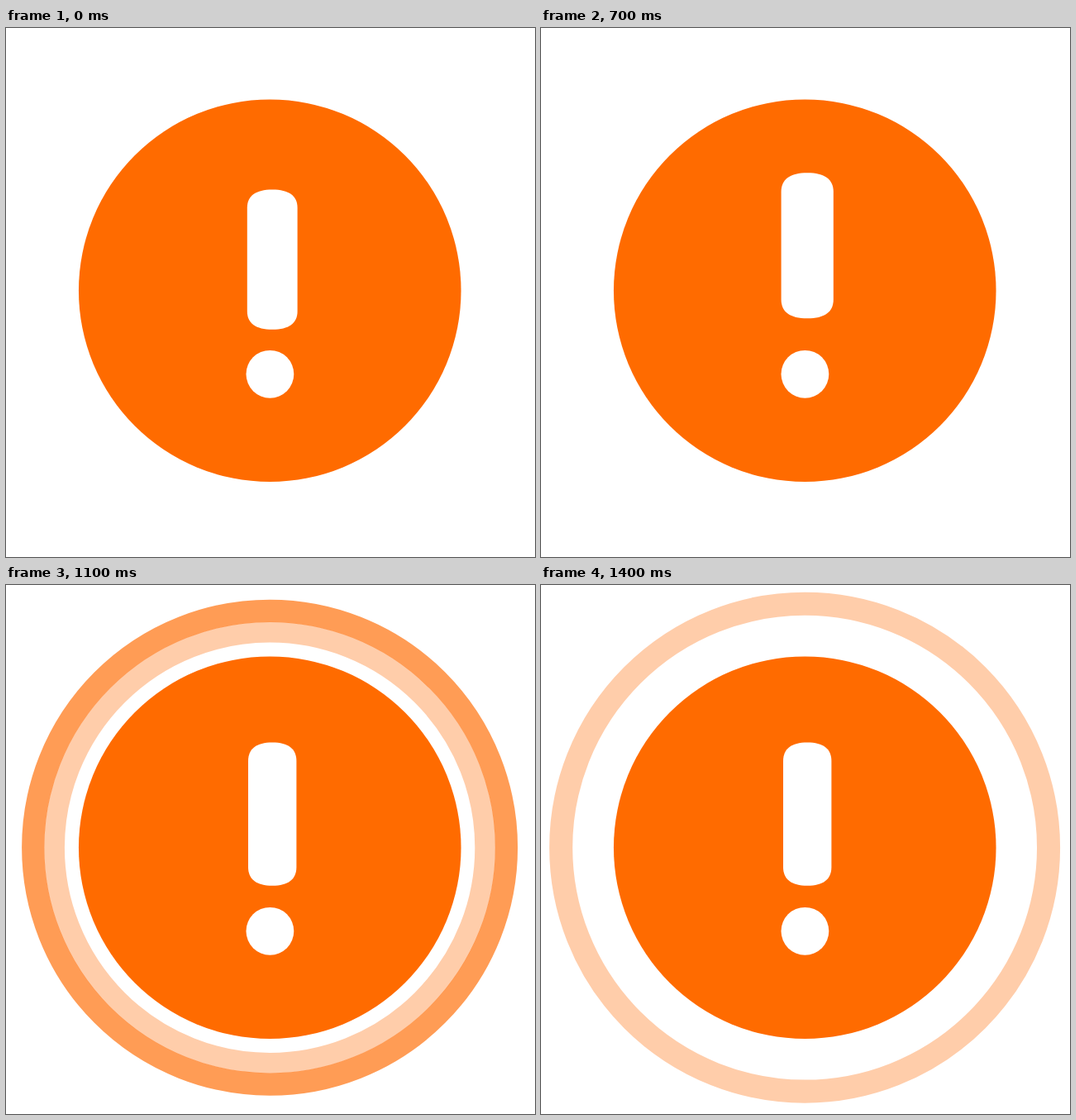
Write an HTML page that moves like this. It is 640 px wide and 640 px high and loops after 1.5 s.

```html
<!DOCTYPE html>
<html lang="en">
<head>
<meta charset="utf-8">
<title>Alert</title>
<style>
html, body { margin: 0; width: 100%; height: 100%; overflow: hidden; background: #fff; }
svg { display: block; width: 100%; height: 100%; }
</style>
</head>
<body>
<svg viewBox="0 0 640 640">
  <g fill="none" stroke="#ff6b00">
    <circle class="ring" cx="319.1" cy="317.7"/>
    <circle class="ring" cx="319.1" cy="317.7"/>
  </g>
  <circle cx="319.25" cy="317.75" r="231.3" fill="#ff6b00"/>
  <path id="bar" fill="#fff"/>
  <ellipse id="dot" cx="319.4" rx="28.9" fill="#fff"/>
</svg>
<script>
const LOOP = 1500, STEP = 100, TICK = 40;
const APEX = 11, LAND = 19, RING_GAP = 6;
const bar = document.getElementById('bar');
const dot = document.getElementById('dot');
const rings = document.querySelectorAll('.ring');

const rest = { w: 58.4, top: 190.5, bottom: 363.8 };
const crouch = { w: 68, top: 210, bottom: 368 };
const leap = { w: 58.4, top: 140.7, bottom: 334.7 };
const apex = { w: 58.4, top: 117, bottom: 314 };

function mix(a, b, u) {
  const out = {};
  for (const k in a) out[k] = a[k] + (b[k] - a[k]) * u;
  return out;
}

// 1 at the peak, falling linearly to 0 at the given reach
const bump = (t, peak, reach) => Math.max(0, 1 - Math.abs(t - peak) / reach);

function set(el, attrs) {
  for (const name in attrs) el.setAttribute(name, attrs[name]);
}

// The jump mirrors around its apex; only the settling is quicker than the windup.
function barPose(tick) {
  const d = Math.abs(tick - APEX);
  if (d <= 4) return mix(apex, leap, (d / 4) ** 2);
  if (d <= 8) return mix(leap, crouch, (d - 4) / 4);
  const span = tick < APEX ? 4 : 3;
  return mix(crouch, rest, Math.min(1, (d - 8) / span));
}

// Pill with slightly full corners
function pill({ w, top, bottom }) {
  const cx = 322.2, rx = w / 2, ry = (bottom - top) * 0.13, k = 0.66;
  const l = cx - rx, r = cx + rx, hx = rx * k, hy = ry * (1 - k);
  const up = top + ry, low = bottom - ry;
  return `M${l} ${up}C${l} ${top + hy} ${cx - hx} ${top} ${cx} ${top}` +
    `S${r} ${top + hy} ${r} ${up}V${low}` +
    `C${r} ${bottom - hy} ${cx + hx} ${bottom} ${cx} ${bottom}` +
    `S${l} ${bottom - hy} ${l} ${low}Z`;
}

function draw(ms) {
  const held = Math.floor((ms % LOOP) / STEP) * STEP;
  const tick = Math.floor(held / TICK);

  set(bar, { d: pill(barPose(tick)) });

  const ry = 28.9 * (1 - 0.1 * bump(tick, LAND + 3, 4));
  set(dot, { cy: 447.7 - ry, ry });

  rings.forEach((ring, i) => {
    const age = tick - LAND - i * RING_GAP;
    const outer = 264 + 4.5 * age;
    const inner = outer / 1.1;
    set(ring, { r: (outer + inner) / 2, 'stroke-width': outer - inner, opacity: bump(age, 6, 6) });
  });
}

const start = performance.now();
function loop() {
  draw(performance.now() - start);
  requestAnimationFrame(loop);
}
loop();
</script>
</body>
</html>
```
